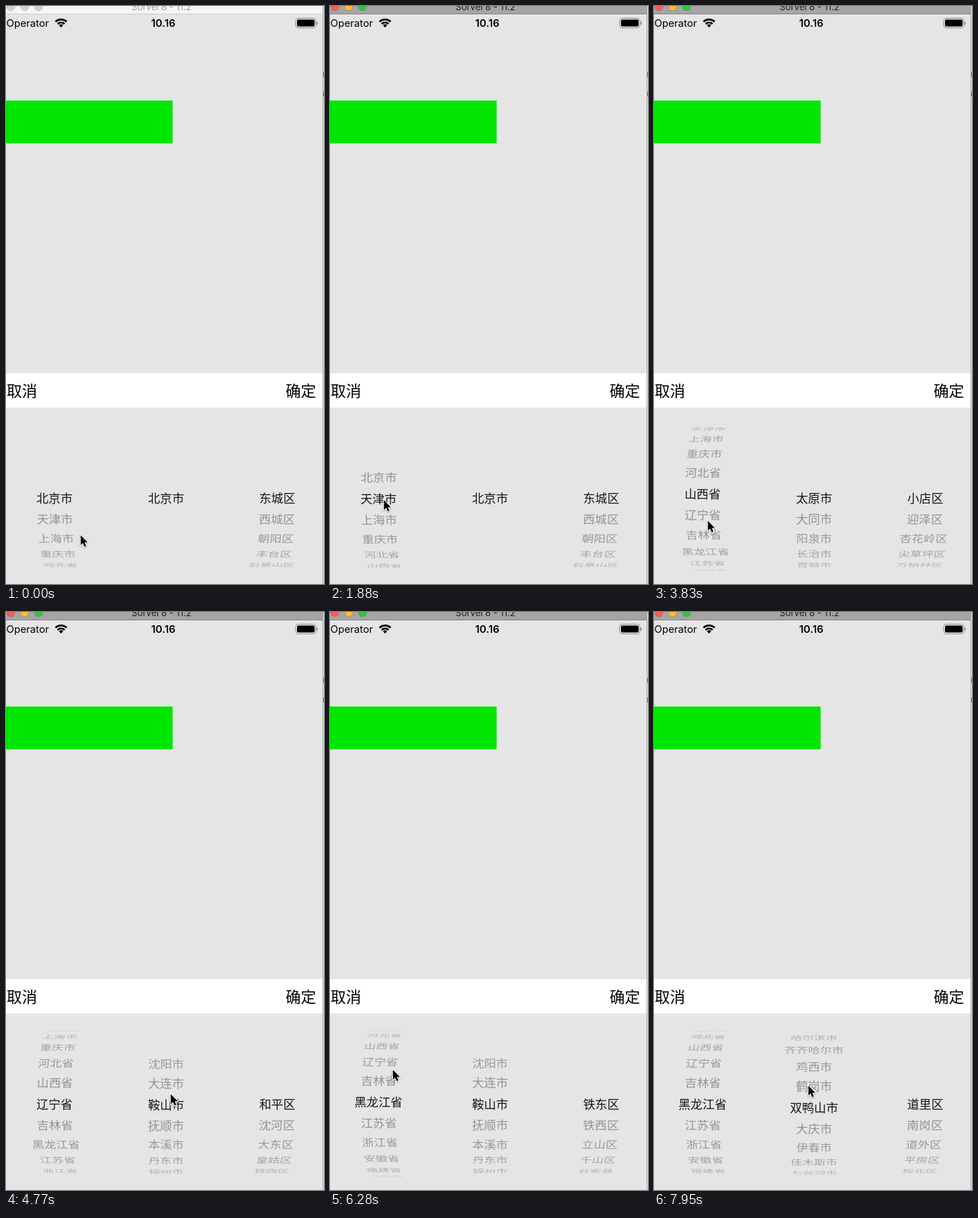
Write an HTML page with a canvas that moves like this. It is 459x832 px and loops after 8 s.

```html
<!DOCTYPE html>
<html lang="zh-CN">
<head>
<meta charset="utf-8">
<title>Region picker</title>
<style>
  html, body { margin: 0; width: 100%; height: 100%; overflow: hidden; background: #e5e5e5; }
  canvas { display: block; width: 459px; height: 832px; }
</style>
</head>
<body>
<canvas id="stage" width="459" height="832"></canvas>
<script>
const ctx = document.getElementById('stage').getContext('2d');
const LOOP = 8000;
const FOCUS_TIME = 1730;
const RELOAD_DELAY = 50;
const CJK = '"Noto Sans CJK SC", "Noto Sans CJK", sans-serif';
const LATIN = 'Inter, sans-serif';

// Rows sit on a cylinder; lean shifts the far rows of the outer wheels inwards
const wheel = { y: 708, radius: 105, step: 0.294, lean: 13, band: 16, size: 17.4 };
const ROW_HEIGHT = wheel.radius * wheel.step;

const words = text => text.split(' ');
const provinces = words('北京市 天津市 上海市 重庆市 河北省 山西省 辽宁省 吉林省 黑龙江省 江苏省 浙江省 安徽省 福建省 江西省 山东省');
const liaoning = words('沈阳市 大连市 鞍山市 抚顺市 本溪市 丹东市 锦州市 营口市 阜新市');

// Each finished drag moves the picker on to the next state
const states = [
  { province: 0, city: 0, cities: ['北京市'], districts: words('东城区 西城区 朝阳区 丰台区 石景山区') },
  { province: 2, city: 0, cities: ['上海市'], districts: words('黄浦区 徐汇区 长宁区 静安区 普陀区') },
  { province: 5, city: 0, cities: words('太原市 大同市 阳泉市 长治市 晋城市'), districts: words('小店区 迎泽区 杏花岭区 尖草坪区 万柏林区') },
  { province: 6, city: 0, cities: liaoning, districts: words('和平区 沈河区 大东区 皇姑区 铁西区') },
  { province: 6, city: 2, cities: liaoning, districts: words('铁东区 铁西区 立山区 千山区 台安县') },
  { province: 8, city: 0, cities: words('哈尔滨市 齐齐哈尔市 鸡西市 鹤岗市 双鸭山市 大庆市 伊春市 佳木斯市 七台河市'), districts: words('道里区 南岗区 道外区 平房区 松北区') },
];

const drags = [
  { wheel: 'province', start: 1730, end: 2270, to: 2, x: 77, y: 740 },
  { wheel: 'province', start: 2580, end: 3115, to: 5, x: 80, y: 746 },
  { wheel: 'province', start: 3790, end: 4213, to: 6, x: 77, y: 746 },
  { wheel: 'city', start: 4450, end: 4815, to: 2, x: 237, y: 754 },
  { wheel: 'province', start: 5820, end: 6280, to: 8.1, x: 90, y: 723 },
  { wheel: 'city', start: 7220, end: 8146, to: 4, x: 222, y: 799 },
];
drags.forEach((drag, i) => drag.from = states[i][drag.wheel]);

// Places where the pointer pauses or turns between drags
const rests = [
  { start: 0, end: 600, x: 107, y: 761 },
  { start: 740, end: 910, x: 94, y: 772 },
  { start: 1670, end: 1670, x: 76, y: 764 },
  { start: 5460, end: 5520, x: 339, y: 708 },
  { start: 7090, end: 7150, x: 176, y: 760 },
];
const stops = [...rests, ...drags].sort((a, b) => a.start - b.start);

const clamp = k => Math.min(1, Math.max(0, k));
const mix = (a, b, k) => a + (b - a) * k;
const easeOut = k => 1 - (1 - k) ** 2;
const easeInOut = k => k * k * (3 - 2 * k);
const progress = (time, start, end) => clamp((time - start) / (end - start));

function dragRow(drag, time) {
  return mix(drag.from, drag.to, easeOut(progress(time, drag.start, drag.end)));
}

function pickerAt(time) {
  const done = drags.filter(drag => time >= drag.end + RELOAD_DELAY).length;
  const drag = drags[done];
  return { ...states[done], [drag.wheel]: dragRow(drag, time) };
}

function pointerAt(time) {
  const i = stops.findLastIndex(stop => stop.start <= time);
  const stop = stops[i], next = stops[i + 1];
  const lift = stop.wheel ? ROW_HEIGHT * (dragRow(stop, time) - stop.from) : 0;
  if (!next || time <= stop.end) return [stop.x, stop.y - lift];
  const k = easeInOut(progress(time, stop.end, next.start));
  return [mix(stop.x, next.x, k), mix(stop.y - lift, next.y, k)];
}

function box(x, y, w, h, color) {
  ctx.fillStyle = color;
  ctx.fillRect(x, y, w, h);
}

function text(string, x, y, font, color, align = 'center') {
  ctx.font = font;
  ctx.fillStyle = color;
  ctx.textAlign = align;
  ctx.fillText(string, x, y);
}

function roundBox(x, y, w, h, r) {
  ctx.beginPath();
  ctx.roundRect(x, y, w, h, r);
}

function drawTitleBar(active) {
  box(0, 0, 457, 11, active ? '#a5a5a5' : '#f5f5f5');
  box(0, 11, 457, 1, active ? '#868686' : '#cfcfcf');
  ['#fc5b57', '#fdbc2e', '#2ac840'].forEach((color, i) => {
    ctx.beginPath();
    ctx.arc(7 + 20 * i, 1, 5.8, 0, 7);
    ctx.fillStyle = active ? color : '#d2d2d2';
    ctx.fill();
    ctx.strokeStyle = 'rgba(0,0,0,.14)';
    ctx.lineWidth = 1;
    ctx.stroke();
  });
  text('Sorvel 8 - 11.2', 224.5, 6, '13px ' + LATIN, active ? '#1c1c1c' : '#9c9c9c');
}

function drawWifi() {
  const up = -Math.PI / 2, spread = 0.77;
  ctx.fillStyle = ctx.strokeStyle = '#000';
  ctx.beginPath();
  ctx.moveTo(79.5, 31);
  ctx.arc(79.5, 31, 4.4, up - spread, up + spread);
  ctx.fill();
  ctx.lineWidth = 2.6;
  for (const r of [7.2, 11.6]) {
    ctx.beginPath();
    ctx.arc(79.5, 31, r, up - spread, up + spread);
    ctx.stroke();
  }
}

function drawBattery() {
  ctx.strokeStyle = ctx.fillStyle = '#8d8d8d';
  ctx.lineWidth = 1;
  roundBox(418, 17.5, 29.5, 14, 4);
  ctx.stroke();
  roundBox(448.5, 22.2, 1.6, 4.6, [0, 2, 2, 0]);
  ctx.fill();
  ctx.fillStyle = '#000';
  roundBox(420, 19.5, 25.5, 10, 2);
  ctx.fill();
}

function drawScreen(active) {
  box(0, 0, 459, 832, '#e5e5e5');
  drawTitleBar(active);
  text('Operator', 0.5, 30, '14.7px ' + LATIN, '#000', 'left');
  text('10.16', 227, 30, '600 15px ' + LATIN, '#000');
  drawWifi();
  drawBattery();
  box(0, 136, 240.5, 61.6, '#00e600');
  box(0, 528.4, 457, 49.6, '#fff');
  text('取消', 23, 562, '22px ' + CJK, '#000');
  text('确定', 425.5, 562, '22px ' + CJK, '#000');
  box(457, 0, 1, 832, '#a3a3a3');
  box(458, 0, 1, 832, '#ececec');
  for (const y of [95, 123]) box(458, y, 1, 7, '#777');
}

function drawRows(rows, selected, x, side, colorOf) {
  rows.forEach((label, i) => {
    const offset = i - selected;
    if (offset < -5.2 || offset > 4.95) return;
    const angle = offset * wheel.step;
    const sin = Math.sin(angle), cos = Math.cos(angle);
    ctx.save();
    ctx.transform(
      1 - 0.05 * (1 - cos), 0,
      side * wheel.lean * sin / wheel.radius, cos,
      x + side * wheel.lean * (1 - cos), wheel.y + wheel.radius * sin
    );
    text(label, 0, wheel.size * 0.38, wheel.size + 'px ' + CJK, colorOf(cos));
    ctx.restore();
  });
}

function clipped(bands, draw) {
  ctx.save();
  ctx.beginPath();
  for (const [top, bottom] of bands) ctx.rect(0, top, 457, bottom - top);
  ctx.clip();
  draw();
  ctx.restore();
}

function drawWheel(rows, selected, x, side) {
  const top = wheel.y - wheel.band, bottom = wheel.y + wheel.band;
  clipped([[601, top], [bottom, 814]], () =>
    drawRows(rows, selected, x, side, cos => `rgba(0,0,0,${0.37 * Math.sqrt(cos)})`));
  clipped([[top, bottom]], () =>
    drawRows(rows, selected, x, side, () => '#161616'));
}

const arrow = new Path2D('M0 0V14.2L3.2 11.2L5.5 16.4L7.9 15.4L5.7 10.3H10.1Z');

function drawPointer(x, y) {
  ctx.save();
  ctx.translate(x + 0.8, y + 0.8);
  ctx.shadowColor = 'rgba(0,0,0,.35)';
  ctx.shadowBlur = 2;
  ctx.shadowOffsetY = 1;
  ctx.strokeStyle = '#fff';
  ctx.lineWidth = 2;
  ctx.stroke(arrow);
  ctx.shadowColor = 'transparent';
  ctx.fillStyle = '#000';
  ctx.fill(arrow);
  ctx.restore();
}

function render(now) {
  const time = Math.max(0, now) % LOOP;
  const picker = pickerAt(time);
  drawScreen(time >= FOCUS_TIME);
  drawWheel(provinces, picker.province, 70, 1);
  drawWheel(picker.cities, picker.city, 231, 0);
  drawWheel(picker.districts, 0, 391.5, -1);
  drawPointer(...pointerAt(time));
}

const started = performance.now();
function tick(now) {
  render(now - started);
  requestAnimationFrame(tick);
}
render(0);
requestAnimationFrame(tick);
</script>
</body>
</html>
```
